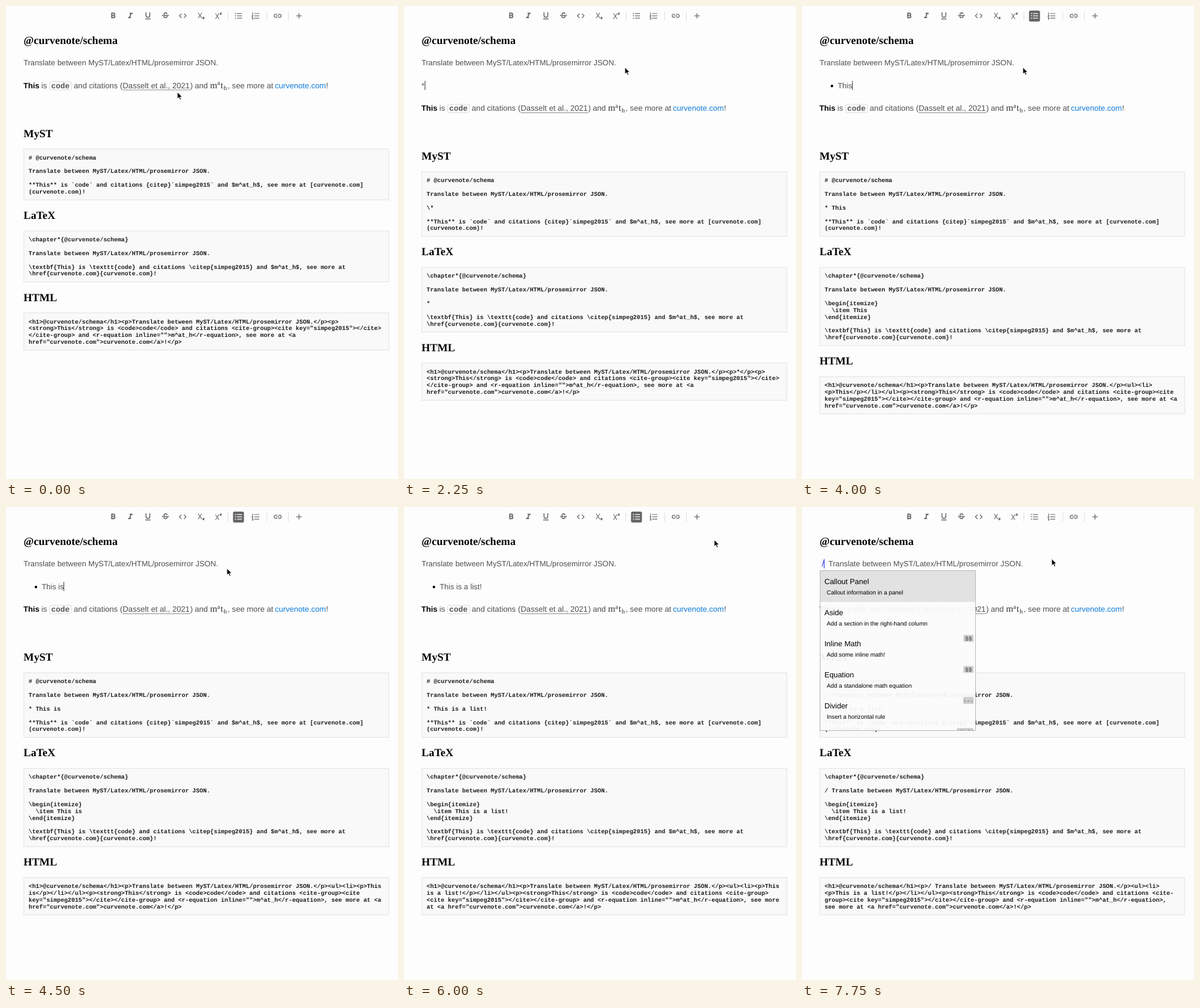
Recreate the animation shown at these times as an HTML page. Size 681 by 822 pixels, loop 8000 ms.

```html
<!DOCTYPE html>
<html lang="en">
<head>
<meta charset="utf-8">
<title>Editor with live export</title>
<style>
  html, body { margin: 0; width: 100%; height: 100%; overflow: hidden; background: #fdfdfd; }
  svg { display: block; }
  text { white-space: pre; text-rendering: geometricPrecision; }
  .body { font: 13.3px "Liberation Sans", Arial, sans-serif; fill: #505050; }
  .rich { font: 13.6px "Liberation Sans", Arial, sans-serif; fill: #505050; }
  .strong { font: bold 13.4px "Liberation Sans", Arial, sans-serif; fill: #000; }
  .head { font: bold 19px "Liberation Serif", Times, serif; fill: #000; }
  .code { font: bold 10.32px "Liberation Mono", Courier, monospace; fill: #1c1c1c; }
  .chip { font: bold 13.3px "Liberation Mono", Courier, monospace; fill: #555; }
  .math { font: 16px "Liberation Serif", Times, serif; fill: #333; }
  .small { font: 11px "Liberation Serif", Times, serif; fill: #333; }
  .link { font: 13.5px "Liberation Sans", Arial, sans-serif; fill: #0f7bd8; }
  .title { font: 13px "Liberation Sans", Arial, sans-serif; fill: #000; }
  .hint { font: 10.25px "Liberation Sans", Arial, sans-serif; fill: #000; }
  .key { font: 10px "Liberation Mono", "DejaVu Sans Mono", monospace; fill: #444; text-anchor: middle; }
  .icon { fill: none; stroke: #666; stroke-width: 2; }
</style>
</head>
<body>
<svg id="stage" width="681" height="822" viewBox="0 0 681 822"></svg>
<script>
const LOOP = 8000, STEP = 250;
const LINE = 11.87, PAD = 8.6, COLS = 99;
const SENTENCE = 'Translate between MyST/Latex/HTML/prosemirror JSON.';

// Tracks hold [start ms, value]; values change in hard steps.
const MOUSE = [[0, [297.8, 149.7]], [250, [301, 138]], [500, [328, 104]], [750, [362, 75]], [1000, [380, 92]],
  [1250, [383.8, 106.7]], [6000, [539, 57]], [6250, [137, 75]], [6500, [433.8, 90.2]]];
const BLOCK = [[0, ''], [1500, 'paragraph'], [2750, 'list']];
const TYPED = [[0, ''], [2000, '*'], [2750, ''], [3750, 'Th'], [4000, 'This'], [4250, 'This i'], [4500, 'This is'],
  [4750, 'This is a'], [5250, 'This is a li'], [5500, 'This is a list'], [5750, 'This is a list!']];
const CARET = [[0, ''], [1500, 'block'], [3250, ''], [3750, 'block'], [6000, ''], [6750, 'start'],
  [7250, 'space'], [7500, 'start'], [7750, 'slash']];
const LEAD = [[0, ''], [7250, ' '], [7750, '/ ']];

const ICONS = [
  [186, 'M8.5 5.2h4.7a2.8 2.8 0 0 1 0 5.6H8.5zM8.5 10.8h5a2.9 2.9 0 0 1 0 5.9h-5z', 2.7],
  [216, 'M10 5.5h8M6 16.5h8M14 5.5L10 16.5', 2.8],
  [246.5, 'M7.2 3v8a4.8 4.8 0 0 0 9.6 0V3M5 20h14', 2.3],
  [277, 'M16.1 7.5C16 3.3 8.3 3.2 8.3 7.1c0 1 .5 1.7 1.4 2.4M3 11h18M7.9 13.1c0 5 8.2 4.3 8.2.8 0-1-.4-1.6-1-2.3', 2.3],
  [307, 'M8.7 6.7L3.4 12l5.3 5.3M15.3 6.7l5.3 5.3-5.3 5.3'],
  [337, 'M7.4 4l9.2 14M16.6 4L7.4 18M19 15.5h3.5v2h-3v2H23', 1.7],
  [367, 'M7.4 6l9.2 14M16.6 6L7.4 20M19 4.5h3.5v2h-3v2H23', 1.7],
  [404, 'M8 6h13M8 12h13M8 18h13M4 5.5a.5.5 0 1 0 .01 0M4 11.5a.5.5 0 1 0 .01 0M4 17.5a.5.5 0 1 0 .01 0'],
  [434, 'M8 6h13M8 12h13M8 18h13M2.5 4.5h1.4v4M2 10.5h2.4L2.2 13.6h2.6M2 16.5h2.5v4H2M3 18.5h1.5', 1.7],
  [472, 'M10.8 8H7a4 4 0 0 0 0 8h3.8M13.2 8H17a4 4 0 0 1 0 8h-3.8M8 12h8'],
  [509, 'M12 5v14M5 12h14']
];
const MENU = [
  ['Callout Panel', 'Callout information in a panel'],
  ['Aside', 'Add a section in the right-hand column'],
  ['Inline Math', 'Add some inline math!', '$$'],
  ['Equation', 'Add a standalone math equation', '$$'],
  ['Divider', 'Insert a horizontal rule', '---'],
  ['Code', 'Insert a code block', '⌘⌥0']
];

const stage = document.getElementById('stage');
const pen = document.createElement('canvas').getContext('2d');
pen.font = '13.3px "Liberation Sans", Arial, sans-serif';

const at = (track, t) => track.filter(k => k[0] <= t).pop()[1];
const esc = s => s.replace(/&/g, '&amp;').replace(/</g, '&lt;');
const text = (cls, x, y, s) => `<text class="${cls}" x="${x}" y="${y}">${esc(s)}</text>`;
const rect = (x, y, w, h, attrs) => `<rect x="${x}" y="${y}" width="${w}" height="${h}" ${attrs}/>`;

// Breaks after spaces and hyphens and between adjoining tags or brackets.
function wrap(source) {
  const lines = [''];
  for (const word of source.split(/(?<= )(?! )|(?<=\w-)(?=\w)|(?<=>)(?=<)|(?<=\])(?=\()/)) {
    const last = lines.length - 1;
    if (lines[last] && (lines[last] + word).trimEnd().length > COLS) lines.push(word);
    else lines[last] += word;
  }
  return lines;
}

function toolbar(listOn) {
  const bars = [385.5, 453, 490.5].map(x => rect(x - .5, 9.5, 1, 16, 'fill="#ddd"')).join('');
  const lit = listOn ? rect(394.4, 8, 19, 19, 'rx="2.5" fill="#666"') : '';
  return bars + lit + ICONS.map(([x, d, w = 2]) => `<path class="icon" d="${d}" transform="translate(${x - 8.1} 9) scale(.675)"
    style="stroke-width:${w}${listOn && x === 404 ? ';stroke:#fff' : ''}"/>`).join('');
}

function richLine(y) {
  return text('strong', 30.3, y, 'This') + text('rich', 61.5, y, 'is') +
    rect(75.5, y - 11.5, 38.5, 14.5, 'rx="3" fill="#fafafa" stroke="#ddd"') + text('chip', 78.5, y, 'code') +
    text('rich', 117.8, y, 'and citations (') + text('rich', 202.8, y, 'Dasselt et al., 2021') +
    rect(203, y + 2.6, 117, 1, 'fill="#888"') + text('rich', 320, y, ')') + text('rich', 328, y, 'and') +
    text('math', 354.5, y, 'm') + text('small', 367, y - 5.5, 'a') + text('math', 372.8, y, 't') +
    text('small', 378, y + 3, 'h') + text('rich', 385, y, ',') + text('rich', 392.6, y, 'see more at') +
    text('link', 467.3, y, 'curvenote.com') + text('rich', 556, y, '!');
}

function exportsOf(lead, block, typed) {
  const first = lead + SENTENCE, list = block === 'list', tex = String.raw;
  const item = list ? ['* ' + typed, ''] : typed ? ['\\' + typed, ''] : [];
  const env = list ? [tex`\begin{itemize}`, tex`  \item ` + typed, tex`\end{itemize}`, ''] : typed ? [typed, ''] : [];
  const p = `<p>${typed}</p>`;
  const html = list ? `<ul><li>${p}</li></ul>` : block ? p : '';
  return [
    ['MyST', ['# @curvenote/schema', '', first, '', ...item,
      '**This** is `code` and citations {citep}`simpeg2015` and $m^at_h$, see more at [curvenote.com](curvenote.com)!']],
    ['LaTeX', [tex`\chapter*{@curvenote/schema}`, '', first, '', ...env,
      tex`\textbf{This} is \texttt{code} and citations \citep{simpeg2015} and $m^at_h$, see more at \href{curvenote.com}{curvenote.com}!`]],
    ['HTML', [`<h1>@curvenote/schema</h1><p>${first}</p>${html}<p><strong>This</strong> is <code>code</code> and citations ` +
      '<cite-group><cite key="simpeg2015"></cite></cite-group> and <r-equation inline="">m^at_h</r-equation>, ' +
      'see more at <a href="curvenote.com">curvenote.com</a>!</p>']]
  ];
}

function panels(top, sections) {
  return sections.map(([name, source]) => {
    const lines = source.flatMap(wrap), height = lines.length * LINE + 2 * PAD;
    const out = text('head', 30.5, top - 20.8, name) +
      rect(31, top, 634, height, 'fill="#f9f9f9" stroke="#e0e0e0"') +
      lines.map((s, i) => text('code', 39.2, top + 18.2 + i * LINE, s)).join('');
    top += height + 54;
    return out;
  }).join('');
}

function menu() {
  const items = MENU.map(([title, hint, key], i) => {
    const y = 111 + i * 54, w = key && key.length > 2 ? (i > 4 ? 29 : 18) : 17.5;
    return text('title', 39, y + 22.6, title) + text('hint', 43, y + 41, hint) +
      (key ? rect(298 - w, y + 3.3, w, 12, 'rx="1.5" fill="#cdcdcd"') + text('key', 298 - w / 2, y + 12.5, key) : '');
  }).join('');
  return '<clipPath id="menu">' + rect(31, 110.5, 271, 278.5, '') + '</clipPath><g clip-path="url(#menu)">' +
    rect(31, 110, 271, 279, 'fill="#fbfbfb" fill-opacity=".95"') + rect(31, 111, 271, 54, 'fill="#e2e2e2"') + items + '</g>' +
    rect(31.5, 110.5, 270, 278, 'fill="none" stroke="#b5b5b5"');
}

function draw(t) {
  const block = at(BLOCK, t), typed = at(TYPED, t), lead = at(LEAD, t), caret = at(CARET, t), [mx, my] = at(MOUSE, t);
  const list = block === 'list', slash = lead === '/ ', shift = block ? 39.6 : 0;
  const left = list ? 62 : 30.5;
  const caretX = { block: left + pen.measureText(typed).width, start: 30.5, space: 34, slash: 38.3 }[caret];

  let out = toolbar(list && t < 6750) + text('head', 30.6, 65.6, '@curvenote/schema');
  if (slash) out += rect(31, 90, 11, 16, 'rx="2" fill="#f6f6fc"') + `<text class="body" x="34.5" y="102.7" style="fill:#22d">/</text>`;
  out += text('body', slash ? 46 : lead ? 34.2 : 30.5, 102.7, SENTENCE);
  if (list) out += '<circle cx="52" cy="139" r="2.2"/>';
  if (block) out += text('body', left, 142.8, typed);
  out += richLine(142.8 + shift) + panels(248.5 + shift, exportsOf(lead, block, typed));
  if (slash) out += menu();
  if (caret) out += rect(Math.round(caretX), caret === 'block' ? 130 : 90.5, 1, 16, `fill="${slash ? '#22d' : '#333'}"`);
  out += `<path transform="translate(${mx} ${my})" stroke="#fff" stroke-width=".9"
    d="M0 0v11.6l2.7-2.5 1.9 4.3 2-.9-1.9-4.1h3.7z"/>`;
  stage.innerHTML = out;
}

const begun = performance.now();
let shown = -1;
function tick() {
  const step = Math.floor((performance.now() - begun) % LOOP / STEP);
  if (step !== shown) draw((shown = step) * STEP);
  requestAnimationFrame(tick);
}
tick();
</script>
</body>
</html>
```
